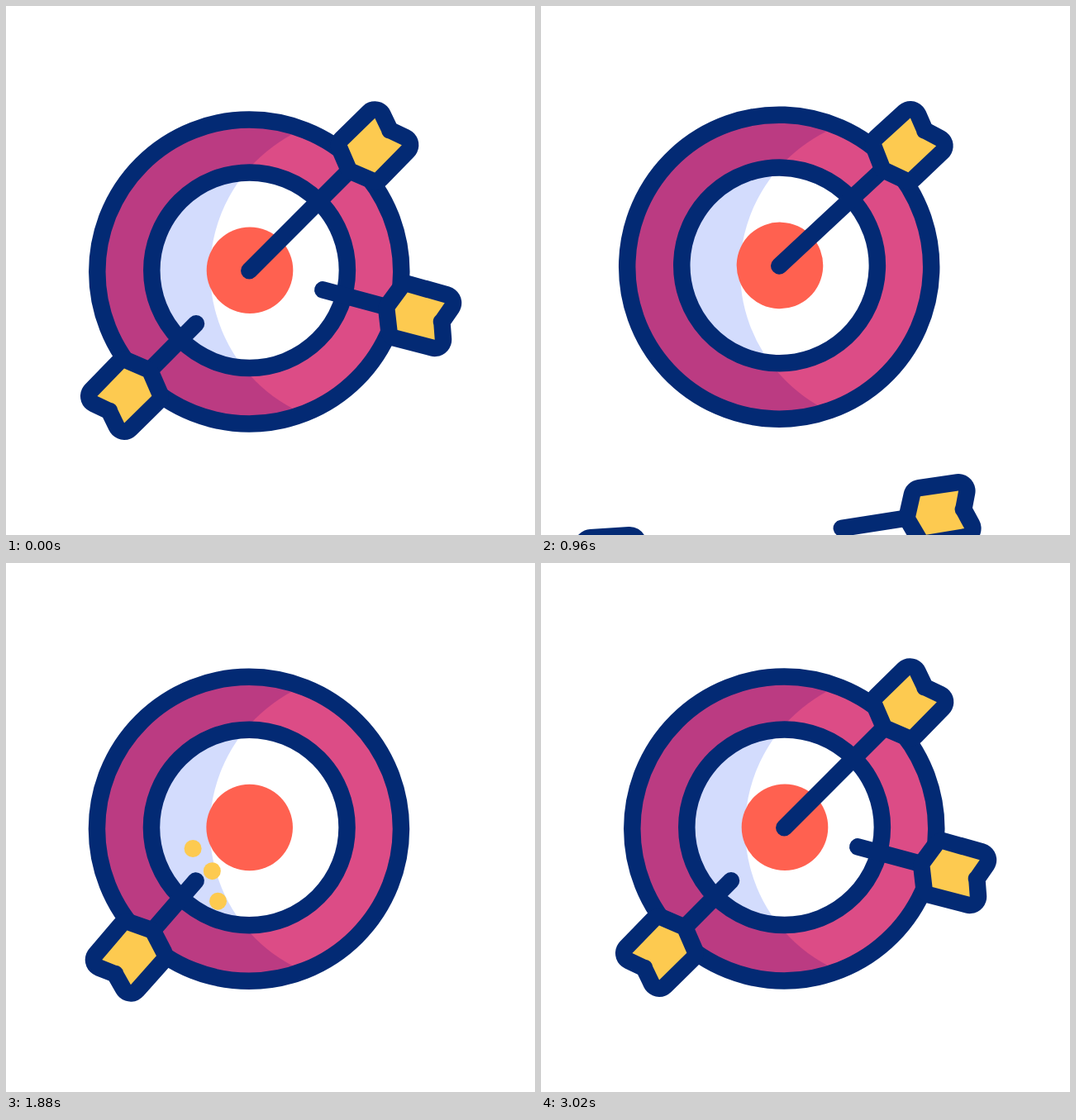
Write an HTML page that moves like this. It is 640 px wide and 640 px high and loops after 3.24 s.

```html
<!DOCTYPE html>
<html lang="en">
<head>
<meta charset="utf-8">
<title>Target and arrows</title>
<style>
  html, body { margin: 0; width: 100%; height: 100%; overflow: hidden; background: #fff; }
  svg { display: block; width: 100%; height: 100%; }
</style>
</head>
<body>
<svg id="stage" viewBox="0 0 640 640">
  <defs>
    <clipPath id="outer"><circle cx="294.3" cy="321.5" r="184"/></clipPath>
    <clipPath id="inner"><circle cx="294.6" cy="319.7" r="118"/></clipPath>
  </defs>
  <g id="group">
    <circle cx="294.3" cy="321.5" r="184" fill="#bb3b82"/>
    <circle cx="435" cy="321" r="188" fill="#dc4c86" clip-path="url(#outer)"/>
    <circle cx="294.3" cy="321.5" r="184" fill="none" stroke="#032a74" stroke-width="20.5"/>
    <circle cx="294.6" cy="319.7" r="118" fill="#d3dcfd"/>
    <circle cx="435" cy="321" r="188" fill="#fff" clip-path="url(#inner)"/>
    <circle cx="294.6" cy="319.7" r="118.3" fill="none" stroke="#032a74" stroke-width="20.5"/>
    <circle cx="295" cy="319.7" r="52.3" fill="#ff6150"/>
    <g id="dots" fill="#fdca50"></g>
    <g id="arrows"></g>
  </g>
</svg>
<script>
const LOOP = 3240, REFILL = 1560, SPEED = 1.8, BURST = 375, SETTLE = 440;
const NAVY = '#032a74', YELLOW = '#fdca50';
const PIVOT = '452 150';
const rad = Math.PI / 180;

// time, angle of the swinging target
const swing = [[260, 0], [400, 7.1], [660, -4.9], [855, 7.6], [1085, -5], [1225, 1.2], [1330, 0]];

// angle, distance and heading offset of each spark
const sparks = [[87.7, 65], [14, 41], [-50, 70]];

// fall: start, span, drop, drop power, drift, turn, turn power
const arrows = [
  { x: 230, y: 384.3, angle: 134.8, len: 90.5, fall: [380, 580, 292, 1.35, -3, 40, 0.54],
    from: [-0.775, 0.632], land: 1763 },
  { x: 383.3, y: 343.3, angle: 15.1, len: 90.5, fall: [620, 340, 290, 1.6, -2, -25.9, 1.14],
    from: [0.966, 0.26], land: 2172 },
  { x: 294.3, y: 320.2, angle: -45, len: 182, fall: [1085, 435, 390, 1.6, 10, 68, 0.8],
    from: [0.718, -0.696], land: 2582 }
];

function add(parent, tag, attrs) {
  const el = document.createElementNS('http://www.w3.org/2000/svg', tag);
  for (const k in attrs) el.setAttribute(k, attrs[k]);
  return parent.appendChild(el);
}

const group = document.getElementById('group');
const dotLayer = document.getElementById('dots');
const arrowLayer = document.getElementById('arrows');

for (const a of arrows) {
  a.el = add(arrowLayer, 'g', {});
  const n = a.len;
  const head = `M${n} 0L${n + 9.3} -23.5L${n + 56} -23L${n + 50} -6` +
    `Q${n + 46} 0 ${n + 50} 6L${n + 56} 23L${n + 9.3} 23.5Z`;
  add(a.el, 'path', { d: `M0 0H${n}`, stroke: NAVY, 'stroke-width': 20.5, 'stroke-linecap': 'round' });
  add(a.el, 'path', { d: head, fill: NAVY, stroke: NAVY, 'stroke-width': 41, 'stroke-linejoin': 'round' });
  add(a.el, 'path', { d: head, fill: YELLOW });
  a.dots = sparks.map(() => add(dotLayer, 'circle', { r: 0 }));
}

function swingAt(t) {
  for (let i = 1; i < swing.length; i++) {
    const [t0, a] = swing[i - 1], [t1, b] = swing[i];
    if (t >= t0 && t < t1) return a + (b - a) * (1 - Math.cos(Math.PI * (t - t0) / (t1 - t0))) / 2;
  }
  return 0;
}

function pose(a, t) {
  if (t < REFILL) {
    const [start, span, drop, p, drift, turn, q] = a.fall;
    const u = Math.max(0, t - start) / span;
    return [drift * u, drop * u ** p, turn * u ** q];
  }
  const age = t - a.land;
  if (age < 0) return [-a.from[0] * SPEED * age, -a.from[1] * SPEED * age, 0];
  const quiver = 7 * Math.max(0, 1 - age / 340) * Math.sin(2 * Math.PI * age / 140);
  return [0, 0, quiver];
}

function drawSparks(a, age) {
  const on = age > 0 && age < BURST;
  const size = on ? 10.5 * Math.min(1, age / 70, (BURST - age) / 25) : 0;
  const reach = 1 - (1 - Math.min(1, Math.max(0, age) / 350)) ** 2;
  sparks.forEach(([turn, dist], i) => {
    const dir = (a.angle + 180 + turn) * rad, dot = a.dots[i];
    dot.setAttribute('r', size);
    dot.setAttribute('cx', a.x + dist * reach * Math.cos(dir));
    dot.setAttribute('cy', a.y + dist * reach * Math.sin(dir));
  });
}

function draw(t) {
  let gx = 0, gy = 0;
  for (const a of arrows) {
    const [dx, dy, turn] = pose(a, t), age = t - a.land;
    a.el.setAttribute('transform', `translate(${a.x + dx} ${a.y + dy}) rotate(${a.angle + turn})`);
    drawSparks(a, age);
    if (age > 0 && age < SETTLE) {
      const push = 1.4 * Math.exp(-age / 120) * Math.sin(2 * Math.PI * age / 180);
      gx -= a.from[0] * push;
      gy -= a.from[1] * push;
    }
  }
  group.setAttribute('transform', `translate(${gx} ${gy}) rotate(${swingAt(t)} ${PIVOT})`);
}

const began = performance.now();
function tick() {
  draw((performance.now() - began) % LOOP);
  requestAnimationFrame(tick);
}
tick();
</script>
</body>
</html>
```
